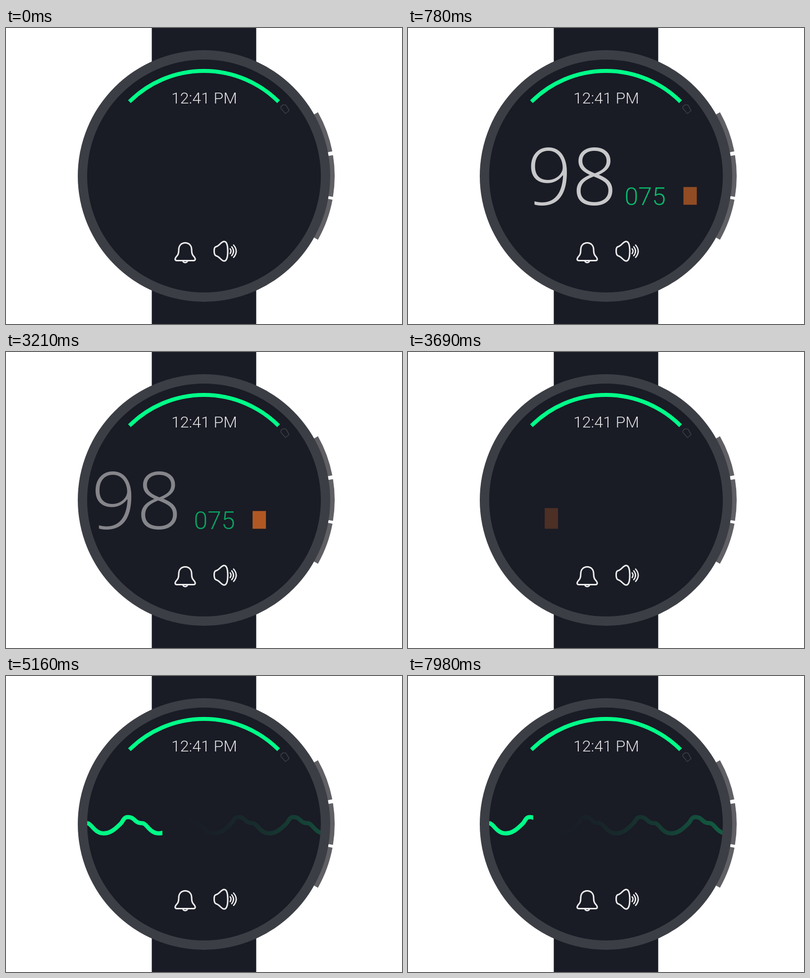
These frames come from a looping animation (800 by 600 pixels, 8000 ms). An HTML page:

```html
<!DOCTYPE html>
<html lang="en">
<head>
<meta charset="utf-8">
<title>Watch face</title>
<style>
  html, body { margin: 0; width: 100%; height: 100%; overflow: hidden; background: #fff; }
  svg { display: block; width: 100vw; height: 100vh; }
  text { font-family: Roboto, "Open Sans", sans-serif; font-weight: 300; }
  .line { fill: none; stroke: #ededed; stroke-width: 3; stroke-linecap: round; stroke-linejoin: round; }
</style>
</head>
<body>
<svg viewBox="0 0 800 600" xmlns="http://www.w3.org/2000/svg">
  <defs>
    <clipPath id="screen"><circle cx="400" cy="300" r="236"/></clipPath>
    <linearGradient id="trail" gradientUnits="userSpaceOnUse" spreadMethod="repeat" y1="0" y2="0"/>
  </defs>

  <rect x="294.5" width="211" height="600" fill="#191b25"/>
  <g id="buttons" fill="none" stroke="#5f5f64" stroke-width="14"></g>
  <circle cx="400" cy="300" r="255" fill="#3c3e45"/>
  <circle cx="400" cy="300" r="236" fill="#191b25"/>

  <path id="ring" fill="none" stroke="#00ff88" stroke-width="8"/>
  <text x="400.5" y="153" font-size="32" text-anchor="middle" fill="#e4e4e4">12:41 PM</text>
  <path d="M560 155.5 L565.5 156 L572 167.5 L564.5 173.5 L555 162.5 L555.5 159Z"
        fill="none" stroke="#3c3e45" stroke-width="1.6" stroke-linejoin="round"/>

  <g clip-path="url(#screen)">
    <g id="main"><text x="237" y="357.5" font-size="160" fill="#e8e8e8" style="font-family:'Open Sans','Noto Sans',sans-serif">98</text></g>
    <g id="rate"><text x="420.5" y="358.5" font-size="50" fill="#00ff88">075</text></g>
    <g id="level"><rect id="bar" x="512" width="27" fill="#e87025"/></g>
    <path id="wave" fill="none" stroke="url(#trail)" stroke-width="8.5"/>
  </g>

  <g class="line">
    <path d="M362 435.5C353.5 435.5 349 442 349 449C349 460 346 461 343 465C340.5 469 342 471.5 345 471.5H379C382 471.5 383.5 469 381 465C378 461 375 460 375 449C375 442 370.5 435.5 362 435.5Z"/>
    <path d="M357.7 472.5a4.3 3 0 0 0 8.6 0"/>
    <path d="M420.5 452C420.5 446 421.5 444 425 443C431 441 435 433.5 440 432.8C446 432 448 441 448 452.5C448 464 446 473 440 472.2C435 471.5 431 463.5 425 462C421.5 461 420.5 458 420.5 452Z"/>
    <path stroke-width="2.6" d="M452.8 447.5q3.6 4.8 0 9.8M456 443.5q7.4 9 0 18M459.8 440q10.6 12.5 0 25"/>
  </g>
</svg>
<script>
const $ = id => document.getElementById(id);
const NS = "http://www.w3.org/2000/svg";
const LOOP = 8000, STEP = 30;
const clamp = v => Math.min(1, Math.max(0, v));
const ease = v => (1 - Math.cos(Math.PI * clamp(v))) / 2;

function add(parent, tag, attrs) {
  const el = parent.appendChild(document.createElementNS(NS, tag));
  for (const k in attrs) el.setAttribute(k, attrs[k]);
}

// Clockwise arc around the watch centre, degrees from 3 o'clock
function arc(r, from, to) {
  const at = a => {
    const rad = a * Math.PI / 180;
    return `${400 + r * Math.cos(rad)} ${300 + r * Math.sin(rad)}`;
  };
  return `M${at(from)}A${r} ${r} 0 0 1 ${at(to)}`;
}

$("ring").setAttribute("d", arc(213, -135, -45));
for (const [a, b] of [[-29.3, -10.9], [-9.2, 9.2], [10.5, 29.3]])
  add($("buttons"), "path", { d: arc(257, a, b) });

const BEAT = "c8 1 14 20.5 32 20.5c14 0 24 -9 35 -20c5 -5 5 -13 14.5 -13c8 0 11 4 15 7.5c4 4 9 5 15 5";
$("wave").setAttribute("d", "M53.5 298.5" + BEAT.repeat(6));

// The trail brightens towards the sweeping head, then repeats
const SPEED = 0.352, SWEEP = 3000 * SPEED;
for (let i = 0; i <= 24; i++)
  add($("trail"), "stop", { offset: i / 24, "stop-color": "#00ff88", "stop-opacity": ease(i / 24) });

// Each part decelerates in from the right and accelerates out to the left
const PARTS = [["main", 963, 2700], ["rate", 1107, 2772], ["level", 1230, 2905]];
function slide(t, id, inEnd, outStart) {
  const entering = t < 2000;
  const d = Math.max(0, entering ? inEnd - t : t - outStart);
  const x = 4.877e-7 * d ** 3 * (entering ? 1 : -1);
  $(id).setAttribute("transform", `translate(${x} 0)`);
  $(id).setAttribute("opacity", clamp(1.03 - d / 1000));
}

// [start, end, direction] of each change in bar height
const PULSES = [[1200, 1320, 1], [1770, 1920, -1], [2100, 2220, 1], [2940, 3060, -1], [3630, 3750, 1]];

function draw(t) {
  for (const p of PARTS) slide(t, ...p);

  let h = 36;
  for (const [a, b, dir] of PULSES) h += 12 * dir * ease((t - a) / (b - a));
  $("bar").setAttribute("y", 358.3 - h);
  $("bar").setAttribute("height", h);

  const head = 165 + SPEED * (t - 4730);
  $("trail").setAttribute("x1", head - SWEEP);
  $("trail").setAttribute("x2", head);
  $("wave").setAttribute("opacity", clamp((t - 4020) / 780));
}

const start = performance.now();
function tick() {
  const t = (performance.now() - start) % LOOP;
  draw(Math.floor(t / STEP) * STEP);
  requestAnimationFrame(tick);
}
draw(0);
requestAnimationFrame(tick);
</script>
</body>
</html>
```
